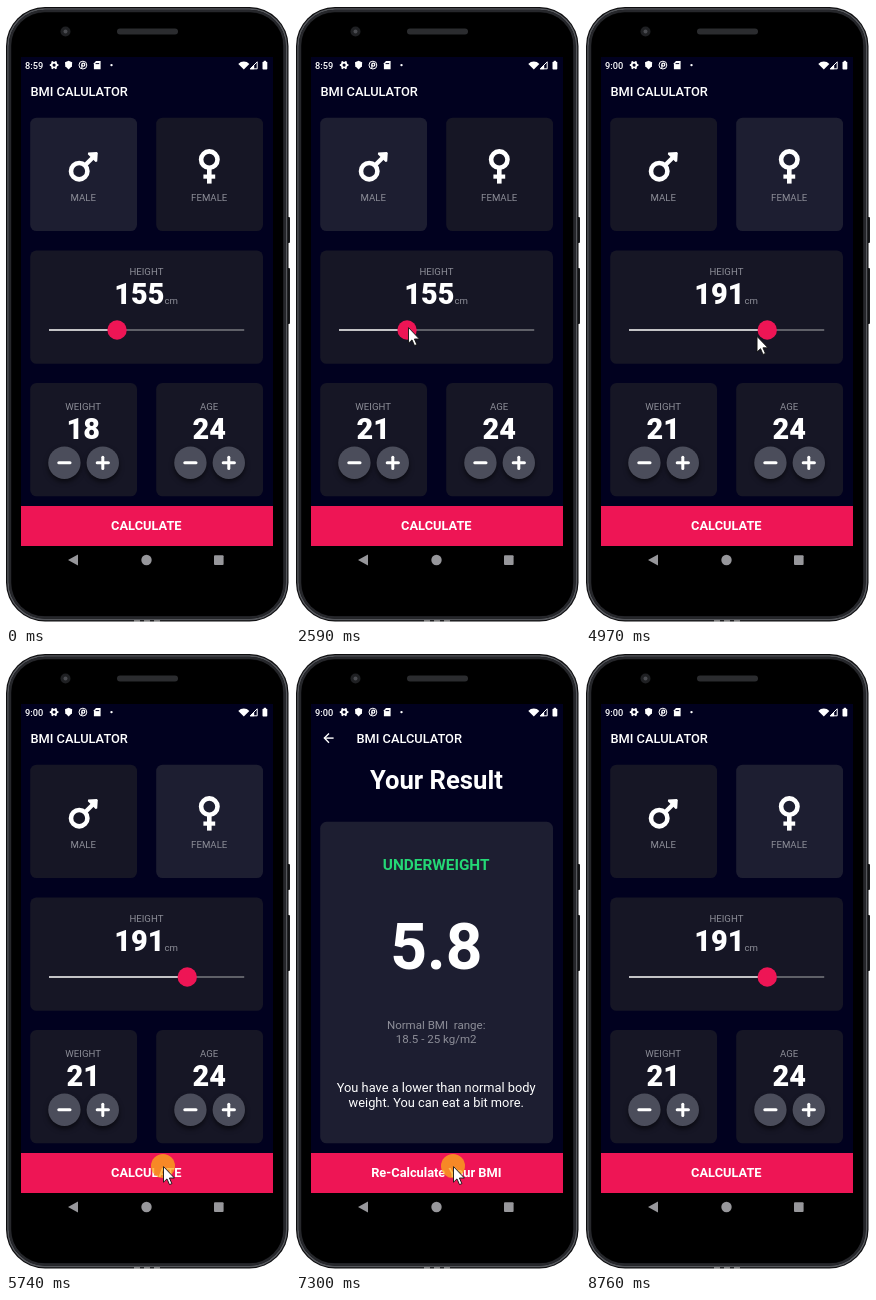
These frames come from a looping animation (284x619 px, 9430 ms). An HTML page with a canvas:

```html
<!DOCTYPE html>
<html lang="en">
<head>
<meta charset="utf-8">
<title>BMI calculator</title>
<style>
html, body { margin: 0; width: 100%; height: 100%; overflow: hidden; background: #fff; }
canvas { display: block; }
</style>
</head>
<body>
<canvas id="stage" width="284" height="619"></canvas>
<script>
const W = 284, H = 619, LOOP = 9430, DP = 0.6413;
const stage = document.getElementById('stage').getContext('2d');
const layer = document.createElement('canvas');
layer.width = W;
layer.height = H;
const layerCtx = layer.getContext('2d');
let g = stage;

const BG = '#01011f', ACTIVE = '#1d1e31', IDLE = '#161625';
const PINK = '#ee1555', GRAY = '#8d8e98', WHITE = '#fff';
const APP = { x: 15, y: 51, w: 252, h: 489 };

// ---------- drawing helpers ----------
function box(x, y, w, h, r, fill) {
  g.beginPath();
  g.roundRect(x, y, w, h, r);
  g.fillStyle = fill;
  g.fill();
}
function frame(x, y, w, h, r, width, color) {
  g.beginPath();
  g.roundRect(x, y, w, h, r);
  g.lineWidth = width;
  g.strokeStyle = color;
  g.stroke();
}
function disc(x, y, r, fill) {
  g.beginPath();
  g.arc(x, y, r, 0, Math.PI * 2);
  g.fillStyle = fill;
  g.fill();
}
function ring(x, y, r, width, color) {
  g.beginPath();
  g.arc(x, y, r, 0, Math.PI * 2);
  g.lineWidth = width;
  g.strokeStyle = color;
  g.stroke();
}
function trace(points, close) {
  g.beginPath();
  points.forEach(([x, y]) => g.lineTo(x, y));
  if (close) g.closePath();
}
function poly(points, fill) {
  trace(points, true);
  g.fillStyle = fill;
  g.fill();
}
function line(points, width, color, cap = 'butt') {
  trace(points);
  g.lineWidth = width;
  g.lineCap = cap;
  g.strokeStyle = color;
  g.stroke();
}
function text(str, x, y, dp, weight = 400, color = WHITE, align = 'center') {
  g.font = `${weight} ${dp * DP}px Roboto, sans-serif`;
  g.textAlign = align;
  g.fillStyle = color;
  g.fillText(str, x, y);
}
function shifted(dx, dy, draw) {
  g.save();
  g.translate(dx, dy);
  draw();
  g.restore();
}

// ---------- timing helpers ----------
const clamp = v => Math.max(0, Math.min(1, v));
const span = (t, a, b) => clamp((t - a) / (b - a));

function cubicBezier(x1, y1, x2, y2) {
  const at = (s, a, b) => 3 * (1 - s) * (1 - s) * s * a + 3 * (1 - s) * s * s * b + s * s * s;
  return x => {
    let lo = 0, hi = 1;
    for (let i = 0; i < 20; i++) {
      const mid = (lo + hi) / 2;
      if (at(mid, x1, x2) < x) lo = mid; else hi = mid;
    }
    return at(lo, y1, y2);
  };
}
const fastOutSlowIn = cubicBezier(0.4, 0, 0.2, 1);
const easeIn = cubicBezier(0.42, 0, 1, 1);
const easeInOut = cubicBezier(0.42, 0, 0.58, 1);
const easeOut = power => u => 1 - Math.pow(1 - u, power);

// ---------- script of the pointer ----------
const DRAG = [2850, 3450];
const moves = [
  { from: 340, to: 1070, a: [266, 609], c: [165, 500], b: [103, 461], ease: easeOut(2.2) },
  { from: 1900, to: 2590, a: [103, 461], c: [102, 375], b: [112, 321], ease: easeOut(2.6) },
  { from: DRAG[0], to: DRAG[1], a: [112, 321], c: [146, 322], b: [181, 320], ease: easeInOut },
  { from: 3840, to: 4020, a: [162, 307], c: [148, 235], b: [207, 174], ease: easeOut(1.7) },
  { from: 4790, to: 5510, a: [207, 174], c: [157, 330], b: [157, 513], ease: easeOut(2.27) },
  { from: 8340, to: 8760, a: [157, 513], c: [195, 545], b: [247, 621], ease: u => Math.pow(u, 1.6) }
];
const presses = [[1270, 1360], [1480, 1570], [1690, 1780], [2800, 3530],
                 [4330, 4540], [5740, 5950], [7300, 7510]];
const weightTaps = [1410, 1620, 1830];

function pointerAt(t) {
  const m = moves.filter(k => t >= k.from).pop();
  const u = m.ease(span(t, m.from, m.to)), v = 1 - u;
  return [0, 1].map(i => v * v * m.a[i] + 2 * u * v * m.c[i] + u * u * m.b[i]);
}

// ---------- phone ----------
function drawPhone() {
  g.fillStyle = WHITE;
  g.fillRect(0, 0, W, H);
  box(280, 211, 4, 26, 1, '#17181a');
  box(280, 262, 4, 56, 1, '#17181a');
  box(0, 1, 282.5, 614.5, 39, '#0d0d0f');
  frame(2, 3, 278.5, 610.5, 37, 1.6, '#55575c');
  frame(4, 5, 274.5, 606.5, 35, 2.4, '#26272b');
  box(5.5, 6.5, 271.5, 603.5, 33, '#000');
  box(111, 22.5, 61, 6, 3, '#2b2c2f');
  disc(59.5, 25.5, 5, '#1f2023');
  disc(59.5, 25.5, 2, '#4a4b50');
  g.setLineDash([6, 4]);
  line([[128, 615], [154, 615]], 1, '#d8d8d8');
  g.setLineDash([]);

  poly([[62, 554], [72, 548.5], [72, 559.5]], '#97979b');
  disc(140.5, 554, 5.2, '#97979b');
  box(208, 549.3, 9.6, 9.6, 1, '#97979b');
}

function drawStatus(t) {
  text(t < 3200 ? '8:59' : '9:00', 19.5, 62.8, 14.4, 500, WHITE, 'left');
  for (let i = 0; i < 6; i++) {
    const a = i * Math.PI / 3, x = Math.cos(a), y = Math.sin(a);
    line([[48.5 + x * 2.5, 59.3 + y * 2.5], [48.5 + x * 4.3, 59.3 + y * 4.3]], 1.9, WHITE);
  }
  ring(48.5, 59.3, 2.4, 1.7, WHITE);
  poly([[63, 55], [66.6, 56.4], [66.3, 60.5], [63, 63.7], [59.7, 60.5], [59.4, 56.4]], WHITE);
  ring(77.3, 59.3, 3.9, 1, WHITE);
  ring(77.7, 58.9, 1.5, 1.3, WHITE);
  line([[76.3, 59], [76.3, 62.6]], 1.2, WHITE);
  poly([[90.4, 55.2], [95, 55.2], [95, 63.4], [88.3, 63.4], [88.3, 57.4]], WHITE);
  line([[90, 57.8], [93.6, 57.8]], 1, BG);
  disc(105.9, 59.3, 1.2, WHITE);

  g.beginPath();
  g.moveTo(238.2, 63.6);
  g.arc(238.2, 63.6, 7.8, -Math.PI * 0.75, -Math.PI * 0.25);
  g.fillStyle = WHITE;
  g.fill();
  trace([[244.6, 63], [251.6, 63], [251.6, 56]], true);
  g.lineWidth = 1;
  g.strokeStyle = WHITE;
  g.stroke();
  poly([[244.2, 63.4], [248.6, 63.4], [248.6, 59]], WHITE);
  box(256.9, 56, 4.8, 7.6, 0.7, WHITE);
  box(258.2, 55, 2.2, 1.5, 0, WHITE);
}

// ---------- app pages ----------
function drawPage(buttonLabel, content) {
  g.fillStyle = BG;
  g.fillRect(APP.x, APP.y, APP.w, APP.h);
  g.fillStyle = PINK;
  g.fillRect(APP.x, 500, APP.w, 40);
  shifted(-0.4, -0.4, () => {
    content();
    text(buttonLabel, 140.7, 524.6, 20, 700);
  });
}

function drawMaleIcon() {
  ring(73.6, 165.6, 8.2, 4.6, WHITE);
  line([[79, 160.2], [88, 151.2]], 4.4, WHITE);
  poly([[82.6, 147], [91.2, 146.4], [92.2, 147.4], [91.6, 156], [90, 156.4], [82.2, 148.6]], WHITE);
}
function drawFemaleIcon() {
  ring(203.7, 154, 8.2, 4.6, WHITE);
  line([[203.7, 163], [203.7, 178]], 4.6, WHITE);
  line([[197.8, 171], [209.6, 171]], 4.2, WHITE);
}

function drawRoundButton(x, plus) {
  const y = 457.2;
  g.save();
  g.shadowColor = 'rgba(0,0,0,.55)';
  g.shadowBlur = 5;
  g.shadowOffsetY = 3;
  disc(x, y, 16.2, '#4b4d5b');
  g.restore();
  line([[x - 5.6, y], [x + 5.6, y]], 3, WHITE, 'round');
  if (plus) line([[x, y - 5.6], [x, y + 5.6]], 3, WHITE, 'round');
}

function drawCounter(cx, label, value) {
  box(cx - 53.4, 377.3, 106.8, 113.4, 6.4, IDLE);
  text(label, cx - 0.5, 404, 15, 400, GRAY);
  text(value, cx - 0.3, 433.8, 45, 900);
  drawRoundButton(cx - 19.2, false);
  drawRoundButton(cx + 19.2, true);
}

function drawSlider(t) {
  const value = Math.round(155 + 36 * easeInOut(span(t, ...DRAG)));
  const x = 43.2 + 1.95 * (value - 120), y = 324.4;
  box(24.6, 244.8, 232.8, 113.4, 6.4, IDLE);
  text('HEIGHT', 140.8, 269, 15, 400, GRAY);
  text(value, 108.6, 298.2, 45, 900, WHITE, 'left');
  text('cm', 158.8, 298.2, 15, 400, GRAY, 'left');
  line([[43.4, y], [238.6, y]], 1.5, '#77787f');
  line([[43.4, y], [x, y]], 1.5, '#e4e4e6');
  const halo = span(t, 2800, 2900) * (1 - span(t, 3530, 3630));
  if (halo > 0) disc(x, y, 19.2 * halo, 'rgba(235,21,85,.17)');
  disc(x, y, 9.7, PINK);
}

function drawInputPage(t) {
  const female = t >= 4640;
  drawPage('CALCULATE', () => {
    text('BMI CALULATOR', 24.8, 90.2, 20, 500, WHITE, 'left');
    box(24.6, 112.1, 106.8, 113.4, 6.4, female ? IDLE : ACTIVE);
    box(150.6, 112.1, 106.8, 113.4, 6.4, female ? ACTIVE : IDLE);
    drawMaleIcon();
    drawFemaleIcon();
    text('MALE', 77.6, 195.6, 15, 400, GRAY);
    text('FEMALE', 203.6, 195.6, 15, 400, GRAY);
    drawSlider(t);
    drawCounter(78, 'WEIGHT', 18 + weightTaps.filter(tap => t >= tap).length);
    drawCounter(204, 'AGE', 24);
  });
}

function drawResultPage() {
  drawPage('Re-Calculate Your BMI', () => {
    line([[38, 85.5], [29, 85.5]], 1.4, WHITE);
    line([[33.4, 80.9], [28.8, 85.5], [33.4, 90.1]], 1.4, WHITE);
    text('BMI CALCULATOR', 60.8, 90.2, 20, 500, WHITE, 'left');
    text('Your Result', 140.8, 136.6, 40, 700);
    box(24.6, 169.2, 232.8, 321.5, 6.4, ACTIVE);
    text('UNDERWEIGHT', 140.6, 217.6, 24, 700, '#24d876');
    text('5.8', 140.8, 316, 100, 700);
    text('Normal BMI  range:', 140.6, 376.6, 18, 400, GRAY);
    text('18.5 - 25 kg/m2', 140.6, 390, 18, 400, GRAY);
    text('You have a lower than normal body', 140.6, 439, 20);
    text('weight. You can eat a bit more.', 140.6, 454, 20);
  });
}

function drawTransition(progress) {
  g = layerCtx;
  g.clearRect(0, 0, W, H);
  drawResultPage();
  g = stage;
  g.save();
  g.beginPath();
  g.rect(APP.x, APP.y, APP.w, APP.h);
  g.clip();
  g.globalAlpha = easeIn(progress);
  g.drawImage(layer, 0, APP.h * 0.25 * (1 - fastOutSlowIn(progress)));
  g.restore();
}

function drawPointer(t) {
  if (t < 340 || t >= 8760) return;
  const [x, y] = pointerAt(t);
  if (presses.some(([down, up]) => t >= down && t < up)) {
    disc(x, y, 12, 'rgba(250,172,24,.76)');
  }
  shifted(x, y, () => {
    trace([[0.5, 0.6], [0.5, 16.2], [4, 12.9], [6.5, 18.6], [8.9, 17.6], [6.4, 12], [11.4, 12]], true);
    g.fillStyle = WHITE;
    g.fill();
    g.lineWidth = 0.9;
    g.lineJoin = 'round';
    g.strokeStyle = '#111';
    g.stroke();
  });
}

function render(t) {
  drawPhone();
  drawInputPage(t);
  const progress = span(t, 6074, 6374) - span(t, 7550, 7850);
  if (progress > 0) drawTransition(progress);
  shifted(-0.4, -0.2, () => drawStatus(t));
  drawPointer(t);
}

let start;
function tick(now) {
  if (start === undefined) start = now;
  render((now - start) % LOOP);
  requestAnimationFrame(tick);
}
requestAnimationFrame(tick);
</script>
</body>
</html>
```
